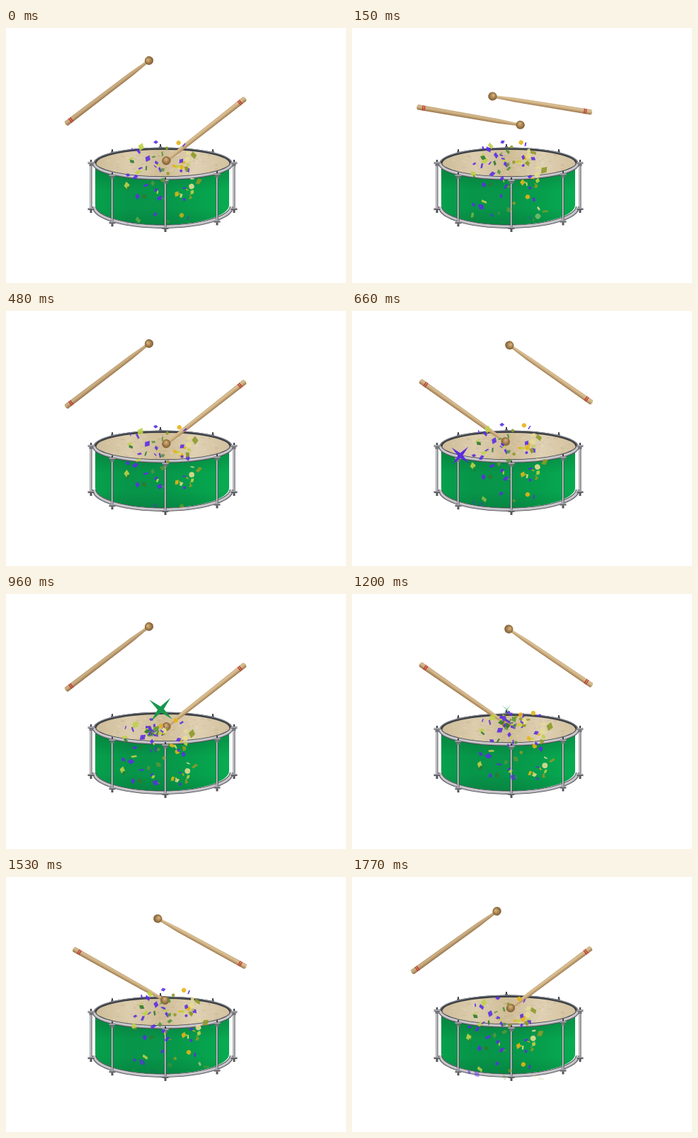
Animation of 480x360 px, one loop 1.8 s. Source, as an HTML page with a canvas:

```html
<!DOCTYPE html>
<html lang="en">
<head>
<meta charset="utf-8">
<title>Drum</title>
<style>
html, body { margin: 0; width: 100%; height: 100%; overflow: hidden; background: #fff; }
canvas { display: block; width: 480px; height: 360px; }
</style>
</head>
<body>
<canvas id="stage" width="480" height="360"></canvas>
<script>
const ctx = document.getElementById('stage').getContext('2d');
const LOOP = 1800, TICK = 30, CYCLE = 450, HIT = CYCLE / 2;
const TAU = Math.PI * 2, DEG = Math.PI / 180;
const mix = (a, b, u) => a + (b - a) * u;
const clamp = u => Math.max(0, Math.min(1, u));

// Seeded noise in 0..1
const rand = n => { const s = Math.sin(n * 127.1 + 11.7) * 43758.5453; return s - Math.floor(s); };

function gradient(x0, y0, x1, y1, colors) {
  const g = ctx.createLinearGradient(x0, y0, x1, y1);
  colors.forEach((c, i) => g.addColorStop(i / (colors.length - 1), c));
  return g;
}

function ellipse(x, y, rx, ry, from = 0, to = TAU) {
  ctx.beginPath();
  ctx.ellipse(x, y, rx, ry, 0, from, to);
}

function arc(x, y, rx, ry, from, to, color, width) {
  ellipse(x, y, rx, ry, from, to);
  ctx.strokeStyle = color;
  ctx.lineWidth = width;
  ctx.stroke();
}

function box(x, y, w, h, color) {
  ctx.fillStyle = color;
  ctx.fillRect(x, y, w, h);
}

const CX = 221.5, HEAD = 191, FOOT = 256;
const ROD_XS = [120, 322, 150, 298, 225], SCREW_XS = [150, 218, 292];
const METAL = ['#4c4d52', '#cfced2', '#8c8b91', '#48494e'];

// How far an x lies toward the viewer on the ring of rods, 0..1
const depth = x => Math.sqrt(Math.max(0, 1 - ((x - 221) / 101) ** 2));

function rod(x, lift) {
  const y = HEAD + 25 * depth(x) + lift, foot = FOOT + 27 * depth(x);
  box(x - 1.5, y, 3, foot - y, gradient(x - 1.5, 0, x + 1.5, 0, METAL));
  box(x - 1, y - 5, 2, 3, '#3c3d43');
  box(x - 4.5, y - 2, 9, 3, gradient(0, y - 2, 0, y + 1, ['#7d7d83', '#b5b4b9', '#44454a']));
  box(x - 2.5, y + 1, 5, 3, '#77777d');
  box(x - 4.5, foot - 2, 9, 3, gradient(0, foot - 2, 0, foot + 1, ['#b9b8bd', '#77777c', '#434349']));
  box(x - 1.5, foot + 1, 3, 4, '#55565b');
}

function shell() {
  ctx.beginPath();
  ctx.moveTo(126, 195);
  ctx.ellipse(CX - 1, 250, 94.5, 28, 0, Math.PI, 0, true);
  ctx.lineTo(315, 195);
  ctx.closePath();
  ctx.fillStyle = gradient(126, 0, 315, 0, ['#06a04c', '#079549', '#07964a', '#069f4c', '#08ac52']);
  ctx.fill();
  ctx.fillStyle = gradient(0, 205, 0, 278, ['#00000020', '#00000000', '#00000000', '#0000001c']);
  ctx.fill();
}

function hoop(y, ry) {
  arc(CX, y, 97, ry, 0, Math.PI, '#4a4b51', 5.4);
  arc(CX, y, 97, ry, 0, Math.PI, '#b3b1b6', 3.6);
  arc(CX, y - 0.5, 97, ry, 0, Math.PI, '#d2d0d4', 1.4);
}

function drum(lift) {
  const cy = HEAD + lift;
  shell();
  hoop(252, 28.3);
  for (const x of SCREW_XS) {
    const y = cy - 25 * depth(x);
    box(x - 1, y - 2, 2, 4, '#3d3e43');
    box(x - 2, y + 1, 4, 3, '#66676c');
  }
  ellipse(CX, cy, 98, 22.5);
  ctx.fillStyle = '#3a3f45';
  ctx.fill();
  arc(CX, cy, 97, 22, Math.PI, TAU, '#85868b', 1.2);
  ellipse(CX, cy + 0.5, 94, 19.5);
  ctx.fillStyle = gradient(128, 0, 315, 0, ['#cfbd99', '#dccdae', '#d0bd97', '#dfd0b3', '#d3c29f']);
  ctx.fill();
  ctx.save();
  ctx.clip();
  ctx.globalAlpha = 0.22;
  for (let i = 0; i < 110; i++)
    box(130 + rand(i) * 184, cy - 18 + rand(i + 300) * 38, 4, 1.2, i % 2 ? '#a78f66' : '#f3ead6');
  ctx.restore();
  hoop(cy, 21);
  for (const x of ROD_XS) rod(x, lift);
}

// 0 = right stick on the head, 1 = left stick on the head, with a rest at both ends
function swing(t) {
  const u = clamp(0.5 - 0.5 * Math.cos((t - 25) / CYCLE * TAU) / 0.87);
  return u * u * (3 - 2 * u);
}

// Drawn from the grip at 0,0 to the ball at len,0; side flips the shading
function stick(x, y, angle, len, side, shade) {
  ctx.save();
  ctx.translate(x, y);
  ctx.rotate(angle * DEG);
  ctx.scale(1, side);
  ctx.beginPath();
  ctx.moveTo(0, -3.7);
  ctx.lineTo(len - 32, -3.1);
  ctx.lineTo(len - 4, -1.9);
  ctx.lineTo(len - 4, 1.9);
  ctx.lineTo(len - 32, 3.1);
  ctx.lineTo(0, 3.7);
  ctx.quadraticCurveTo(-3, 0, 0, -3.7);
  ctx.fillStyle = gradient(0, -4, 0, 4, ['#c9a97c', '#dfc69b', '#c3a172', '#8f6d48']);
  ctx.fill();
  ctx.fillStyle = `rgba(92,58,22,${shade})`;
  ctx.fill();
  for (const band of [6.5, 9]) box(band, -3.6, 1.5, 7.2, '#c23b34');
  const ball = ctx.createRadialGradient(len - 1, -2, 0.5, len, 0, 6.5);
  ['#d3b27e', '#a9834f', '#775630'].forEach((c, i) => ball.addColorStop(i / 2, c));
  ellipse(len, 0, 6.2, 6);
  ctx.fillStyle = ball;
  ctx.fill();
  ctx.restore();
}

function sticks(u) {
  stick(mix(85, 97, u), mix(135, 99, u), mix(-37.3, 35.5, u), 147, 1, mix(0.14, 0.06, u));
  stick(mix(337, 338, u), mix(100, 129, u), 180 + mix(-38.3, 34.9, u), 141, -1, 0.03);
}

// Confetti: purple and green to the left, yellow and gold to the right
const LEFT_HUES = ['#5a2fe3', '#58963c', '#5a2fe3', '#bfd048', '#2f7a30'];
const RIGHT_HUES = ['#bfd048', '#e6b416', '#e4dc92', '#5a2fe3', '#8d9a28'];
const BITS = Array.from({ length: 30 }, (_, i) => {
  const a = rand(i + 40) * TAU, r = Math.sqrt(rand(i + 80));
  const dx = 5 + 48 * r * Math.cos(a), dy = -4 + 27 * r * Math.sin(a);
  return { dx, dy, size: 2 + 2 * rand(i + 120), turn: i * 1.7, round: i % 8 === 3,
    color: (dx < 10 ? LEFT_HUES : RIGHT_HUES)[i % 5] };
});

function bit({ dx, dy, size, turn, round, color }, age) {
  const life = 600 - dy * 4;
  if (age <= 0 || age > life) return;
  const out = 1.17 * (1 - Math.exp(-age / 100));
  ctx.save();
  ctx.translate(217 + dx * out, 185 + (dy - 10) * out + 285 * (age / 1000) ** 2);
  ctx.rotate(turn + age * 0.006);
  ctx.globalAlpha = 0.9 * clamp((life - age) / 60);
  ctx.fillStyle = color;
  if (round) {
    ellipse(0, 0, size, size);
    ctx.fill();
  } else {
    const w = size * (0.65 + 0.35 * Math.cos(age * 0.012 + turn));
    ctx.transform(1, 0, 0.3, 1, 0, 0);
    ctx.fillRect(-size, -w, size * 2, w * 2);
  }
  ctx.restore();
}

// Later strokes throw the cloud from alternating sides
const HOME = [0, 0], LEFT = [-6, 11], RIGHT = [10, -1];
function shiftAt(t) {
  const stroke = Math.floor((t + 75) / HIT);
  return stroke < 4 ? HOME : stroke % 2 ? RIGHT : LEFT;
}

function confetti(t, [x, y]) {
  const newest = (t - 30 + CYCLE) % HIT;
  ctx.save();
  ctx.translate(x, y);
  for (let k = 3; k >= 0; k--) for (const b of BITS) bit(b, newest + k * HIT);
  ctx.restore();
}

const PURPLE = '#5a2be0', GOLD = '#f5ab0d', GREEN = '#17984c';
const STARS = [
  { x: 153, y: 205, color: PURPLE, turn: 45, size: 14, start: 210, life: 180 },
  { x: 303.5, y: 180.5, color: GOLD, turn: 0, size: 17, start: 270, life: 120 },
  { x: 153, y: 204, color: PURPLE, turn: 42, size: 22, start: 630, life: 120 },
  { x: 218.5, y: 163, color: GREEN, turn: 40, size: 28, start: 870, life: 360 }
];

// A star opens and closes, thinner while it is small
function star(t, { x, y, color, turn, size, start, life }) {
  const p = (t - start) / life;
  if (p <= 0 || p >= 1) return;
  const open = Math.sin(p * Math.PI) ** 0.8;
  ctx.beginPath();
  for (let i = 0; i < 8; i++) {
    const a = turn * DEG + i * TAU / 8, d = size * open * (i % 2 ? 0.36 * open * open : 1);
    ctx.lineTo(x + Math.cos(a) * d, y + Math.sin(a) * d);
  }
  ctx.closePath();
  ctx.fillStyle = color;
  ctx.fill();
}

function draw(t) {
  const shift = shiftAt(t);
  box(0, 0, 480, 360, '#fff');
  drum(shift === LEFT ? -2 : 0);
  sticks(swing(t));
  confetti(t, shift);
  for (const s of STARS) star(t, s);
}

const begin = performance.now();
function frame() {
  const t = (performance.now() - begin) % LOOP;
  draw(Math.floor(t / TICK) * TICK);
  requestAnimationFrame(frame);
}
frame();
</script>
</body>
</html>
```
